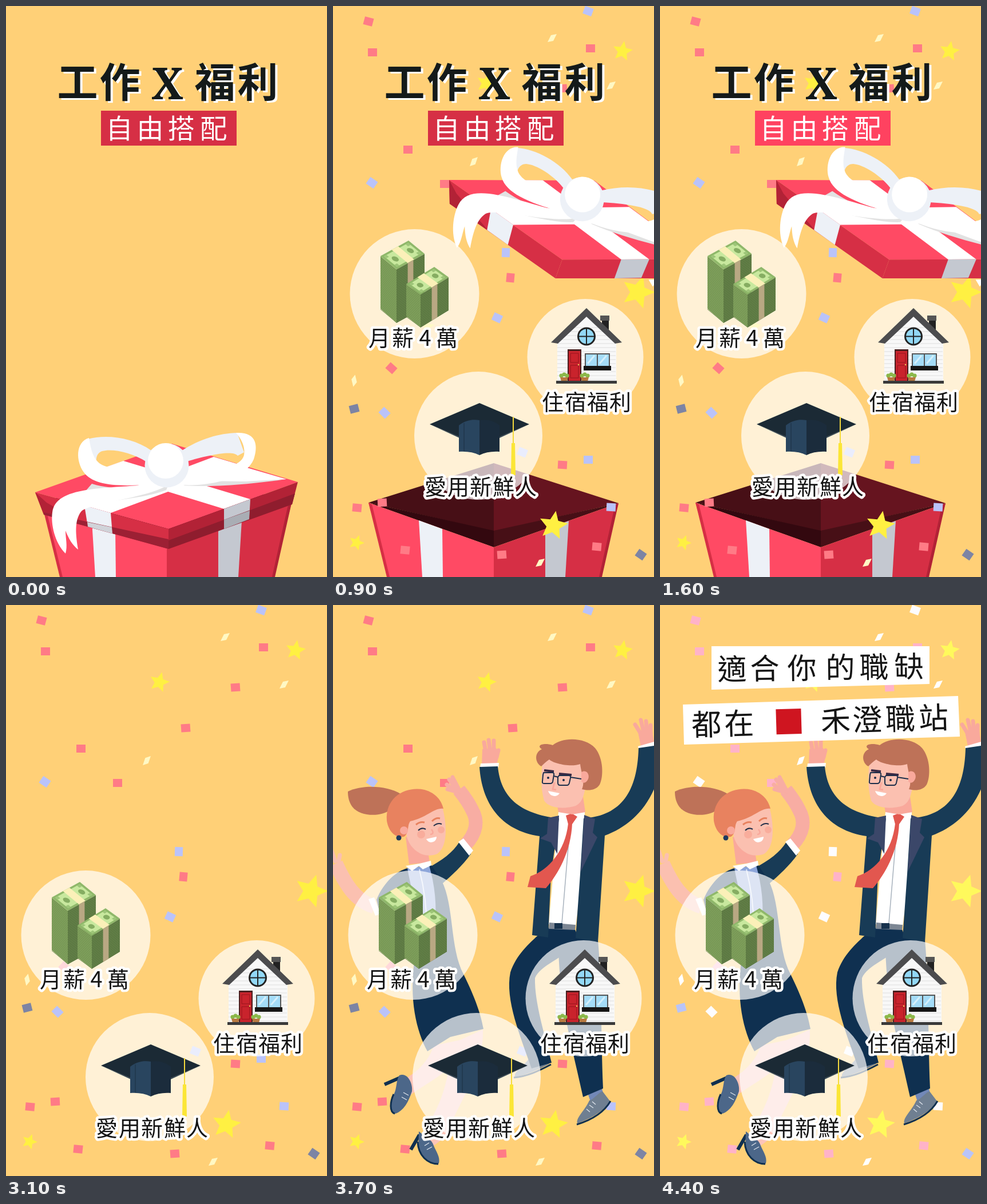
Animation, 561 px wide and 998 px high, one loop 6.4 s. Source, as an HTML page with a canvas:

```html
<!DOCTYPE html>
<html lang="zh-Hant">
<head>
<meta charset="utf-8">
<style>
html, body { margin: 0; width: 100%; height: 100%; overflow: hidden; background: #ffd077; }
canvas { display: block; width: 561px; height: 998px; }
</style>
</head>
<body>
<canvas id="stage" width="561" height="998"></canvas>
<script>
const c = document.getElementById('stage').getContext('2d');
const LOOP = 6400;
const PINK = '#ff4a64', RED = '#d62f45', WINE = '#b22236', NAVY = '#0f3050', SUIT = '#183b56';
const SKIN = '#fbc0b0', BLUSH = '#f9a99c', SANS = '"Noto Sans CJK TC", "Noto Sans CJK", "Noto Sans CJK JP", sans-serif';

// ---- helpers ----
function fill(color, d) {
  c.fillStyle = color;
  c.fill(new Path2D(d));
}
function line(color, width, d, cap = 'butt') {
  c.strokeStyle = color;
  c.lineWidth = width;
  c.lineCap = cap;
  c.lineJoin = 'round';
  c.stroke(new Path2D(d));
}
function disc(color, x, y, r) {
  c.fillStyle = color;
  c.beginPath();
  c.arc(x, y, r, 0, 2 * Math.PI);
  c.fill();
}
function rect(color, x, y, w, h) {
  c.fillStyle = color;
  c.fillRect(x, y, w, h);
}
function at(x, y, deg, draw) {
  c.save();
  c.translate(x, y);
  c.rotate(deg * Math.PI / 180);
  draw();
  c.restore();
}
// Each glyph is centred on its own x; y is the middle of the line.
function glyphs(text, xs, y, size, weight, color, halo = 0) {
  c.font = `${weight} ${size}px ${SANS}`;
  c.textAlign = 'center';
  c.lineJoin = 'round';
  const each = fn => [...text].forEach((ch, i) => fn(ch, xs[i], y + size * 0.38));
  if (halo) {
    c.strokeStyle = '#fff';
    c.lineWidth = halo;
    each((ch, x, b) => c.strokeText(ch, x, b));
  }
  c.fillStyle = color;
  each((ch, x, b) => c.fillText(ch, x, b));
}
function blink(t, start) {
  return t >= start && (t >= start + 400 || Math.floor((t - start) / 100) % 2 === 0);
}

// ---- confetti: x, y, angle (or radius for stars) ----
const squares = {
  pink: [[62, 27, 15], [69, 81, 0], [450, 74, 0], [401, 144, -4], [314, 215, -4], [131, 251, 0],
    [195, 311, 0], [310, 475, 95], [102, 633, 42], [401, 802, 3], [42, 877, 5], [86, 868, -3],
    [126, 951, 6], [295, 959, -4], [461, 945, 5]],
  blue: [[446, 9, 20], [68, 309, 35], [302, 431, 92], [287, 545, 25], [90, 711, 45], [331, 780, 22],
    [446, 793, 0], [486, 876, 3]],
  slate: [[37, 704, -14], [538, 959, 35]]
};
const slips = [[383, 56, 0], [486, 139, 0], [246, 272, -8], [37, 655, -40], [362, 973, 0]];
const stars = [[506, 79, 18, 10], [268, 135, 18, 15], [533, 500, 30, 18], [385, 908, 26, 10],
  [41, 938, 14, 20], [232, 839, 14, 12], [165, 560, 13, 5]];

function star(x, y, r, deg, color) {
  at(x, y, deg, () => {
    c.beginPath();
    for (let i = 0; i < 10; i++) {
      const a = i * Math.PI / 5 - Math.PI / 2, q = i % 2 ? r * 0.46 : r;
      c.lineTo(q * Math.cos(a), q * Math.sin(a));
    }
    c.fillStyle = color;
    c.fill();
  });
}
function confetti(light) {
  const hue = light
    ? { pink: '#ffb3c8', blue: '#fdfcff', slate: '#b9c4f8' }
    : { pink: '#ff7b86', blue: '#bac3fa', slate: '#7d84a4' };
  for (const k in squares)
    for (const [x, y, a] of squares[k]) at(x, y, a, () => rect(hue[k], -8, -7, 16, 14));
  for (const [x, y, a] of slips)
    at(x, y, a, () => fill(light ? '#fff' : '#fff8c4', 'M-8 7L-2 -5L8 -7L2 5Z'));
  for (const [x, y, r, a] of stars) star(x, y, r, a, light ? '#fff95c' : '#fff042');
}

// ---- gift box ----
function box() {
  fill('#470f16', 'M62 868L281 799V918Z');
  fill('#66141f', 'M281 799L499 869L281 918Z');
  fill('#33080f', 'M62 868L281 917V946Z');
  fill('#470f16', 'M499 869L281 917V946Z');
  fill(PINK, 'M62 868L281 946V998H98Z');
  fill(RED, 'M499 869L281 946V998H466Z');
  fill(RED, 'M62 868L68 871L99 998H94Z');
  fill(WINE, 'M499 869L493 872L465 998H470Z');
  fill('#edf1f7', 'M150 899L191 914L192 998H156Z');
  fill('#c4c8d0', 'M412 900L371 915V998H406Z');
}

function bow() {
  // shadows on the lid
  fill('#e2e2e2', 'M150 835C200 850 260 842 285 834L280 846C240 862 180 862 135 876L120 870Z');
  fill('#e2e2e2', 'M310 838C370 842 440 834 490 827L420 831L330 830Z');
  // left tail
  fill('#fff', 'M272 834C225 840 175 840 140 846C105 852 84 862 81 885C78 905 85 938 104 957C108 944 104 930 104 917C110 932 116 942 126 950C122 925 119 900 131 884C145 868 240 862 282 838Z');
  // loops: far strips then near bands
  fill('#edf1f7', 'M143 757C175 748 222 754 254 777L246 797C220 780 185 773 168 778C157 782 156 794 160 804L146 800Z');
  fill('#edf1f7', 'M306 778C340 756 372 747 404 746L416 780L405 786C396 775 350 786 316 796Z');
  fill('#fff', 'M145 755C121 762 122 796 136 815C152 837 192 841 254 836L252 811C210 811 178 810 163 799C150 788 148 770 145 755Z');
  fill('#fff', 'M402 746C438 744 441 768 433 792C420 825 358 840 308 837L316 813C368 814 411 806 416 785C419 770 410 755 402 746Z');
  disc('#edf1f7', 281, 803, 38.5);
  disc('#fff', 279, 795, 31);
}

function lid(closed) {
  fill(PINK, 'M51 850L290 765L510 832L284 914Z');
  fill('#fff', 'M137 873L363 788L410 802L183 886Z');
  fill('#fff', 'M160 811L205 795L427 862L381 879Z');
  fill('#fff', 'M363 790L490 827L330 840L320 815Z');
  fill(RED, 'M51 850L284 914V949L66 889Z');
  fill(WINE, 'M51 850L71 868L145 910L66 889Z');
  fill(closed ? WINE : RED, 'M284 914L510 832L500 871L284 949Z');
  fill('#edf1f7', 'M137 873L183 886L186 922L143 910Z');
  fill('#c4c8d0', 'M381 879L427 862L425 897L381 914Z');
  if (closed) {
    fill('#9c2034', 'M66 885L284 932V949L66 889Z');
    fill('#8f1d2e', 'M284 934L505 852L500 871L284 949Z');
    fill('#d0d3d9', 'M142 902L185 911L186 922L143 910Z');
    fill('#a9adb4', 'M381 898L426 882L425 897L381 914Z');
  } else {
    fill('#fff', 'M438 896L453 890L449 905Z');
  }
  bow();
}
function movedLid(k) {
  at(51 + 152 * k, 850 - 546 * k, 19.8 * k, () => {
    c.translate(-51, -850);
    lid(k === 0);
  });
}

// ---- opening title ----
function title(bright) {
  const word = (color, dx, dy) => {
    glyphs('工作福利', [125 + dx, 199 + dx, 365 + dx, 440 + dx], 132 + dy, 71, 'bold', color);
    c.font = 'bold 76px "Noto Serif", serif';
    c.fillText('X', 282 + dx, 163 + dy);
  };
  word('#fff', 4, 3);
  word('#141a1a', 0, 0);
  rect(bright ? '#ff4260' : RED, 166, 183, 237, 61);
  glyphs('自由搭配', [198, 252, 306, 363], 213, 47, 500, '#fff');
}

// ---- badges ----
function bundle(x, y, w1, h1, w2, h2, depth, band) {
  // top corner list: left, back, right, front; stacked notes as stripes
  const sx = x + w1, sy = y + h1, ex = sx + w2, ey = sy - h2;
  const bx = x + w2, by = y - h2;
  fill('#87a862', `M${x} ${y}L${sx} ${sy}v${depth}L${x} ${y + depth - 2}Z`);
  fill('#66834a', `M${sx} ${sy}L${ex} ${ey}v${depth}L${sx} ${sy + depth}Z`);
  for (let d = 3; d < depth; d += 3) {
    line('#5f7d42', 0.9, `M${x} ${y + d}L${sx} ${sy + d}`);
    line('#4f6a38', 0.9, `M${sx} ${sy + d}L${ex} ${ey + d}`);
  }
  fill('#8fb86a', `M${x} ${y}L${bx} ${by}L${ex} ${ey}L${sx} ${sy}Z`);
  c.save();
  c.transform(w1, h1, w2, -h2, x, y);
  rect('#c8e89e', 0.1, 0.07, 0.8, 0.86);
  c.fillStyle = '#86ad62';
  for (const v of [0.24, 0.78]) {
    c.beginPath();
    c.ellipse(0.5, v, 0.17, 0.08, 0, 0, 7);
    c.fill();
  }
  for (const [u, v] of [[0.1, 0.07], [0.75, 0.07], [0.1, 0.84], [0.75, 0.84]]) rect('#9dc578', u, v, 0.15, 0.09);
  rect('#fbf0b8', 0, 0.4, 1, 0.23);
  c.restore();
  const u = sx + w2 * 0.4, v = sy - h2 * 0.4;
  fill('#b9a883', `M${u} ${v}l${w2 * 0.2} ${-h2 * 0.2}v${band}l${-w2 * 0.2} ${h2 * 0.2}Z`);
}
function money() {
  bundle(83, 437, 28, 23, 49, 27, 94, 50);
  bundle(128, 486, 25, 18, 49, 30, 58, 58);
}
function house() {
  fill('#222', 'M470 548H482V575H470Z');
  rect('#555', 467, 541, 16, 9);
  fill('#f8f8f8', 'M392 585L443 540L495 586V656H392Z');
  for (let y = 562; y < 655; y += 7) {
    const half = Math.min(51, (y - 538) * 1.1);
    line('#dedede', 1, `M${443 - half} ${y}H${443 + half}`);
  }
  fill('#4c4c4e', 'M443 528L505 588L493 590L443 543L393 590L381 588Z');
  disc('#222', 443, 577.5, 16);
  disc('#92d8f6', 443, 577.5, 13);
  line('#222', 2, 'M443 563V592M429 577.5H457');
  rect('#4a2020', 410, 600, 24, 56);
  rect('#c9232c', 412, 603, 20, 53);
  line('#96151d', 1, 'M415 607h14v16h-14ZM415 628h14v22h-14Z');
  disc('#f0d060', 429, 627, 1.2);
  rect('#555', 440, 607, 44, 24);
  rect('#a4dcf8', 442, 609, 19, 20);
  rect('#a4dcf8', 463, 609, 19, 20);
  line('#d5f0fc', 3, 'M445 625L457 611M466 625L478 611');
  rect('#161616', 438, 629, 48, 8);
  for (const x of [404, 440]) {
    for (const dx of [-5, 0, 5]) disc('#8bb84a', x + dx, 646 - (dx ? 0 : 2), 3.6);
    fill('#b8793f', `M${x - 7} 649h14l-2 7h-10Z`);
  }
  rect('#3a3a3a', 390, 655, 106, 5);
}
function cap() {
  fill('#1b2a35', 'M169 731L256 694L343 731L256 768Z');
  fill('#24394a', 'M169 731L256 768L343 731L256 771Z');
  fill('#29455f', 'M220 733C232 723 246 722 256 724V785C246 780 234 778 220 779Z');
  fill('#1b2c3c', 'M256 724C270 722 282 725 291 733V779C278 778 266 780 256 785Z');
  line('#223a50', 2, 'M229 729V778');
  line('#f5da3c', 2, 'M315 718V768');
  fill('#fbe636', 'M312 764H318L319 820H311Z');
}
const badges = [
  { start: 300, x: 142.5, y: 503, r: 113, icon: money, text: '月薪4萬', xs: [81, 122, 161, 199], ty: 580 },
  { start: 600, x: 441, y: 613.5, r: 101.5, icon: house, text: '住宿福利', xs: [384, 424, 463, 502], ty: 692 },
  { start: 900, x: 254, y: 751, r: 112, icon: cap, text: '愛用新鮮人', xs: [179, 219, 258, 298, 337], ty: 840 }
];
function showBadges(t) {
  c.save();
  if (t >= 3100) c.translate(-3, 74);
  for (const b of badges) {
    if (t < b.start) continue;
    disc('rgba(255,255,255,.7)', b.x, b.y, b.r);
    b.icon();
    glyphs(b.text, b.xs, b.ty, 38, 500, '#141414', 9);
  }
  c.restore();
}

// ---- people ----
function man() {
  // legs and shoes
  fill('#7288b8', 'M444 850L470 845L474 862L450 868Z');
  fill('#6f7f91', 'M448 866C456 864 464 852 471 850L484 867C474 884 452 897 427 906C424 896 440 884 448 866Z');
  line(NAVY, 3, 'M485 867C474 886 452 900 426 908');
  line('#dfe5ec', 1.3, 'M448 874l7 5M443 881l6 5M453 868l6 5');
  fill(NAVY, 'M394 568L463 586C470 660 468 750 472 845L437 860C420 780 396 700 394 600Z');
  fill('#6f7f91', 'M346 788L374 790L378 802C358 812 338 822 318 825C315 815 336 805 346 788Z');
  line(NAVY, 3, 'M316 826C340 824 360 814 381 803');
  fill(NAVY, 'M372 564L423 567L432 590C400 618 362 630 353 652C352 695 370 750 382 800L347 810C328 755 300 690 310 642C320 612 342 592 362 574Z');
  // hands
  line(BLUSH, 7, 'M268 262L264 240M275 260L272 236M281 260L281 237M286 266L289 254', 'round');
  fill(BLUSH, 'M261 252L285 250L290 262L286 280H260Z');
  line(BLUSH, 7, 'M538 225L528 209M543 222L538 201M549 222L547 203M555 226L555 210', 'round');
  fill(BLUSH, 'M533 222L557 215L561 240L538 247Z');
  fill('#fff', 'M258 277L290 276L289 284L257 285ZM533 247L561 239V249L534 251Z');
  // shirt and jacket
  fill('#fff', 'M394 362H440L436 470L424 562L377 558Z');
  line('#a8b2bd', 1.5, 'M413 400L400 556');
  fill(SUIT, 'M256 283L288 282C293 335 325 365 395 373L381 470L376 581L348 577L361 404C292 394 260 345 256 283Z');
  fill(SUIT, 'M438 373C505 368 532 325 534 250L561 246V322C542 365 510 390 475 403L463 589L424 582L432 470Z');
  fill('#3b4769', 'M376 372L395 368L392 435L381 415L362 408L374 400Z');
  fill('#3b4769', 'M439 367L458 374L454 398L462 406L433 466Z');
  fill('#7d8794', 'M378 555L424 559L423 568L377 566Z');
  rect('#17324d', 387, 556, 14, 10);
  // tie
  fill('#e2574f', 'M407 368L417 364L427 370L418 383H411Z');
  fill('#e2574f', 'M411 382H418C416 430 394 470 372 495L340 493L345 474C376 464 406 430 411 382Z');
  // head
  fill(BLUSH, 'M390 340L437 335L441 362L418 366L394 362Z');
  fill(SKIN, 'M367 270C364 290 362 318 369 342C378 356 405 357 424 351C438 344 444 325 442 272L400 262Z');
  fill('#be7258', 'M364 282C353 276 351 258 365 252C354 245 368 240 384 245C400 231 440 230 458 250C473 268 473 300 466 314C458 326 443 324 435 322C441 310 434 295 432 278C415 284 385 277 378 270C372 274 368 278 364 282Z');
  fill(BLUSH, 'M434 292C444 286 450 298 445 306C441 312 436 312 434 308Z');
  line('#3a2a44', 4, 'M369 289L386 291M395 295L417 297');
  line('#1c2f4a', 2, 'M368 293h15q4 0 3 4l-2 12q-1 3-4 3h-11q-4 0-3-4l1-11zM395 298h17q4 0 3 4l-2 9q-1 4-4 4h-12q-4 0-4-4l0-10zM386 299L394 301M415 301L434 304');
  disc('#1c2f4a', 376, 302, 2);
  disc('#1c2f4a', 403, 306, 2);
  line(BLUSH, 3, 'M387 310L384 322L390 323');
  fill('#fff', 'M376 325L396 329C391 337 379 335 376 325Z');
}

function woman() {
  // legs and shoes
  fill('#fcc4b8', 'M176 770L233 758C228 805 172 830 136 856L111 836C135 825 165 805 176 770Z');
  fill('#fcc4b8', 'M205 768L262 742C264 810 222 865 196 930L176 945L152 928C178 895 206 840 205 768Z');
  line(NAVY, 6, 'M90 838L122 824M136 952L151 926');
  fill('#4c6789', 'M116 822C130 816 140 836 138 850C132 868 124 884 109 889C98 886 100 868 106 856C112 845 110 830 116 822Z');
  fill('#4c6789', 'M150 920C162 930 173 934 176 945C180 955 188 965 185 976C170 980 152 966 149 950Z');
  line(NAVY, 3, 'M108 889C98 886 100 868 106 855M148 938C149 962 165 977 184 977');
  line('#dfe5ec', 1.3, 'M123 852l9 5M120 860l9 5M160 945l8-5M164 952l9-5');
  // arms
  line(SKIN, 25, 'M5 452C20 485 38 517 72 527');
  line(SKIN, 7, 'M4 448L-2 430M10 448L12 437', 'round');
  line('#f8ada3', 24, 'M230 421C252 398 254 377 243 358C236 343 227 332 220 323');
  line('#f8ada3', 7, 'M222 326L209 301M217 323L203 305M214 326L199 314M214 326L200 322', 'round');
  // outfit
  fill(SUIT, 'M165 460C190 447 210 432 221 414L241 435C226 456 208 472 190 488Z');
  fill('#fff', 'M219 414L228 408L245 429L238 438Z');
  fill(NAVY, 'M76 515C90 482 112 465 130 460L172 455L190 482C212 525 204 600 228 645C250 690 258 715 263 741L205 755L165 780C146 745 132 690 143 615C138 575 124 546 110 531L82 540Z');
  fill('#8ea6da', 'M130 460L168 455C178 490 182 525 178 566L152 568C146 525 135 490 130 460Z');
  fill('#fff', 'M62 514L72 511L83 540L74 543Z');
  line('#dfe7f8', 2, 'M151 462C158 490 164 525 164 566');
  // head
  fill('#be7258', 'M26 326C52 313 96 316 118 330L100 358C84 371 47 370 34 353C28 345 26 336 26 326Z');
  fill(BLUSH, 'M127 405L165 425L169 450L133 453Z');
  fill('#fff', 'M127 456L151 452L171 447L172 455L157 462L150 456L138 465Z');
  fill(SKIN, 'M126 385C145 360 178 360 190 349C199 380 202 422 182 435C160 444 136 430 129 405Z');
  fill('#e8825f', 'M94 377C91 335 128 316 160 323C181 329 190 343 193 356C176 354 164 372 135 378C129 386 134 398 124 405C108 408 97 395 94 377Z');
  disc(BLUSH, 124, 394, 7);
  disc('#1f3a5f', 115, 407, 4.5);
  line('#e8825f', 3, 'M145 384Q152 378 160 380M173 378Q180 371 187 373');
  line('#22304a', 2.2, 'M149 394Q155 388 162 392M176 386Q183 380 190 383');
  c.globalAlpha = 0.6;
  disc('#f9a08f', 154, 401, 7);
  disc('#f9a08f', 189, 393, 6);
  c.globalAlpha = 1;
  line(BLUSH, 2.5, 'M172 392Q178 400 170 401');
  fill('#fff', 'M163 409L181 405C181 415 168 419 163 409Z');
}

// ---- closing headline ----
function headline() {
  fill('#fff', 'M90 72H471V138L90 148Z');
  at(281, 109, -0.8, () =>
    glyphs('適合你的職缺', [-155, -98, -33, 34, 93, 154], 0, 51, 500, '#141414'));
  fill('#fff', 'M40 174L521 159L524 230L42 244Z');
  at(281, 202, -1.7, () => {
    glyphs('都在', [-200, -143], 0, 52, 500, '#141414');
    rect('#cf1520', -78, -22, 44, 44);
    glyphs('禾澄職站', [26, 81, 139, 197], 0, 52, 500, '#141414');
  });
}

function enter(draw, t, start, dx, dy) {
  if (t < start) return;
  c.save();
  if (t < start + 100) c.translate(dx, dy);
  draw();
  c.restore();
}

function frame(now) {
  const t = now % LOOP;
  rect('#ffd077', 0, 0, 561, 998);
  if (t < 3100) {
    box();
    if (t >= 200) confetti(false);
    movedLid(Math.min(Math.floor(t / 100), 2) / 2);
    title(blink(t, 1200));
  } else {
    confetti(blink(t, 4000));
    enter(man, t, 3300, -28, 110);
    enter(woman, t, 3600, 113, 110);
  }
  showBadges(t);
  if (t >= 3900) headline();
}

const begin = performance.now();
function tick() {
  frame(performance.now() - begin);
  requestAnimationFrame(tick);
}
tick();
</script>
</body>
</html>
```
